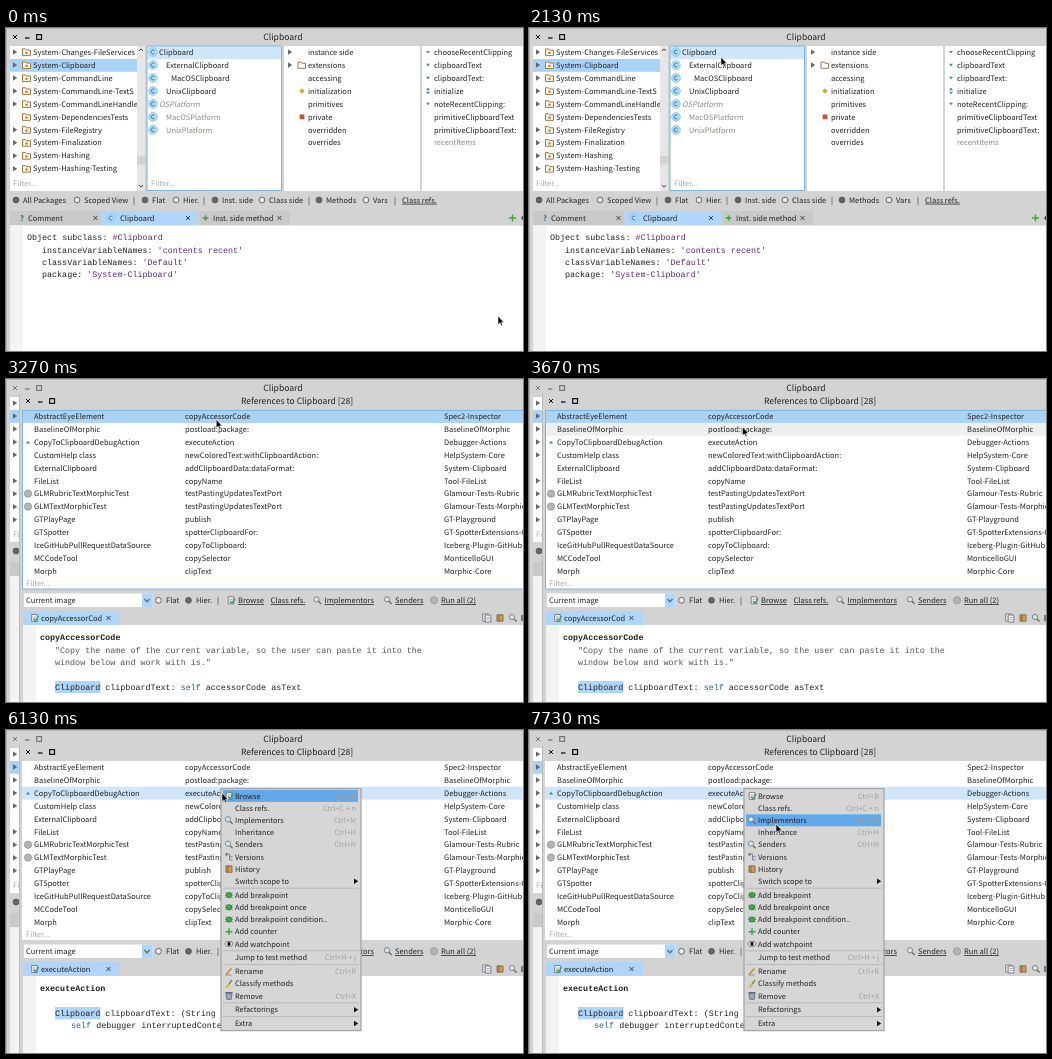
An HTML page for the animation above (8 s loop, 517 by 323 pixels).

```html
<!DOCTYPE html>
<html lang="en">
<head>
<meta charset="utf-8">
<title>Class browser</title>
<style>
html, body { margin: 0; width: 100%; height: 100%; overflow: hidden; background: #d3d3d3; }
svg { display: block; width: 517px; height: 323px; }
text { font: 7.5px "Noto Sans CJK JP", "Noto Sans CJK SC", "Open Sans", sans-serif; fill: #222; white-space: pre; text-rendering: geometricPrecision; }
.title { font-size: 8.57px; text-anchor: middle; }
.menu text { font-size: 7.4px; }
.menu .key { fill: #a2a2a2; text-anchor: end; }
.code { font: 8.39px "Liberation Mono", "DejaVu Sans Mono", monospace; }
.bold { font-weight: bold; }
.lit { fill: #5f2a78; }
.self { fill: #24627c; }
.note { fill: #555; }
.dim { fill: #8b8b84; }
.faint { fill: #a8a8a8; }
.it { font-style: italic; }
.link { text-decoration: underline; }
</style>
</head>
<body>
<svg id="stage" viewBox="0 0 517 323" xmlns="http://www.w3.org/2000/svg"></svg>
<script>
const LOOP = 8000, STEP = 200 / 3, ROW = 12.95, REF_ROW = 12.87;
const GRAY = '#d3d3d3', SEL = '#a9d2f7', SEL_SOFT = '#cfe5f8', TAB = '#afd5f8', HOVER = '#efefef', MENU_SEL = '#62a8ea';

const rect = (x, y, w, h, fill, more = '') => `<rect x="${x}" y="${y}" width="${w}" height="${h}" fill="${fill}" ${more}/>`;
const path = (d, stroke, width = 1, fill = 'none') => `<path d="${d}" stroke="${stroke}" stroke-width="${width}" fill="${fill}"/>`;
const shape = (d, fill) => `<path d="${d}" fill="${fill}"/>`;
const text = (x, y, s, cls = '') => `<text x="${x}" y="${y + 2.7}" class="${cls}">${s}</text>`;
const code = (x, y, s, cls = '') => text(x, y, s, 'code ' + cls);
const span = (cls, s) => `<tspan class="${cls}">${s}</tspan>`;
const group = (id, body, cls = '') => `<g id="${id}" class="${cls}">${body}</g>`;
const disc = (x, y, r, fill, stroke = 'none') => `<circle cx="${x}" cy="${y}" r="${r}" fill="${fill}" stroke="${stroke}" stroke-width=".9"/>`;
const right = (x, y, fill = '#666') => shape(`M${x - 2} ${y - 2.7}l4.2 2.7-4.2 2.7z`, fill);
const down = (x, y) => shape(`M${x - 2} ${y - 1.2}h4l-2 2.6z`, '#3b8f9f');
const up = (x, y) => shape(`M${x - 2} ${y + 1.2}h4l-2-2.6z`, '#3b8f9f');
const cross = (x, y, r = 2, color = '#444') => path(`M${x - r} ${y - r}l${2 * r} ${2 * r}m0 ${-2 * r}l${-2 * r} ${2 * r}`, color, 1);
const plus = (x, y, r = 3.4, color = '#3ba43b') => path(`M${x - r} ${y}h${2 * r}m${-r} ${-r}v${2 * r}`, color, 1.4);
const radio = (x, y, on) => disc(x, y, 2.9, on ? '#666' : '#eee', '#555');
const radios = (y, list) => list.map(([x, s, on, dx = 7]) => s === '|' ? text(x, y, '|') : radio(x, y, on) + text(x + dx, y, s)).join('');
const controls = (x, y, color) => cross(x, y, 2, color) + path(`M${x + 10} ${y + 1}h4.5`, color, 1.3) +
  path(`M${x + 21.7} ${y - 2.3}h4.8v4.6h-4.8z`, color, 1.2);
const classIcon = (x, y) => disc(x, y, 4.3, '#b4dcf3', '#8cc8ea') +
  path(`M${x + 1.5} ${y - 1.4}a2 2 0 1 0 0 2.8`, '#2a7fae', 1);

const icons = {
  page: (x, y) => path(`M${x - 2.8} ${y - 3.5}h5.6v7h-5.6z`, '#667', .8, '#f4f4fa') + path(`M${x - 1.5} ${y - 1}h3m-3 2h3`, '#88a', .7),
  browse: (x, y) => icons.page(x, y) + path(`M${x - 1} ${y + 1}l2 2 3-5`, '#3b9a4c', 1.3),
  mag: (x, y) => disc(x - 1, y - 1, 2.6, '#d9e7f0', '#6c7c88') + path(`M${x + 1} ${y + 1}l2.6 2.6`, '#86684d', 1.4),
  plus: (x, y) => plus(x, y),
  pen: (x, y) => path(`M${x - 3} ${y + 3}l5.5-6`, '#cc8b3c', 1.8) + path(`M${x - 3.4} ${y + 3.5}h6`, '#777', .8),
  trait: (x, y) => disc(x, y, 3.8, '#63bd71') + path(`M${x - 1.8} ${y - 1.6}h3.6m-1.8 0v4`, '#fff', .9),
  jump: (x, y) => disc(x, y, 3.6, '#4fae57') + path(`M${x - 2} ${y}h3.6m-1.5-1.6l1.6 1.6-1.6 1.6`, '#fff', .9),
  box: (x, y) => path(`M${x - 3} ${y - 2.5}h6l-.8 6h-4.4z`, '#5d6a78', .8, '#98a9ba') + path(`M${x - 3.6} ${y - 3.2}h7.2`, '#555', 1),
  bug: (x, y) => path(`M${x - 3.6} ${y - 2.5}l7.2 5m0-5l-7.2 5M${x - 4} ${y}h8`, '#3c6b3c', .7) + disc(x, y, 2.6, '#45a950', '#2c7637'),
  branch: (x, y) => path(`M${x - 3} ${y - 3}h3.5v6h3m-3-3h3`, '#7587a6', 1) + disc(x - 2.5, y - 2.5, 1.3, '#4f8bc5'),
  book: (x, y) => path(`M${x - 3} ${y - 3.2}h6v6.4h-6z`, '#79572e', .8, '#cd9f59') + path(`M${x - 1} ${y - 3}v6`, '#79572e', .8),
  eye: (x, y) => `<ellipse cx="${x}" cy="${y}" rx="4" ry="2.6" fill="#fff" stroke="#444" stroke-width=".7"/>` + disc(x, y, 1.8, '#111'),
  broom: (x, y) => path(`M${x + 3} ${y - 3.5}l-3 4`, '#8c6a42', 1.2) + shape(`M${x - .8} ${y - .4}l2 1.8-2 2.4h-3z`, '#d7b24b')
};

// Menus: [label, shortcut, icon]; '-' is a separator, '>' marks a submenu.
function makeMenu(id, x, y, w, h, items) {
  let cy = y + 7.3, body = '';
  const rows = [];
  for (const item of items) {
    if (item === '-') {
      body += path(`M${x + 2} ${cy - 5.3}h${w - 4}`, '#b2b2b2', .8);
      cy += 1.6;
      continue;
    }
    const [label, key = '', icon] = item;
    if (icon) body += icons[icon](x + 8, cy);
    body += text(x + 14, cy, label);
    body += key === '>' ? right(x + w - 5, cy, '#111') : text(x + w - 5, cy, key, 'key');
    rows.push(cy);
    cy += 12.2;
  }
  const back = rect(x, y, w, h, '#d6d6d6', 'stroke="#a6a6a6" stroke-width="1.3"');
  return { svg: group(id, back + rect(x + 2, y, w - 5, 12, MENU_SEL, `id="${id}Sel"`) + body, 'menu'), rows, id };
}

const classMenu = makeMenu('classMenu', 193, 22.6, 162, 141, [
  ['Browse', 'Ctrl+B', 'browse'], ['Class refs.', 'Ctrl+N'], ['Rename', 'Ctrl+R', 'pen'],
  ['Abstract instance variables', 'Ctrl+A + a', 'plus'], ['Generate accessors', 'Ctrl+G + a', 'plus'],
  ['New trait', '', 'trait'], ['Copy', 'Ctrl+C', 'page'], ['Jump to test class', 'Ctrl+G + j', 'jump'],
  ['Remove', 'Ctrl+X', 'box'], '-', ['Refactorings', '>'], '-', ['Extra', '>']]);

const methodMenu = makeMenu('methodMenu', 215, 58.6, 140, 242, [
  ['Browse', 'Ctrl+B', 'browse'], ['Class refs.', 'Ctrl+C + n'], ['Implementors', 'Ctrl+M', 'mag'],
  ['Inheritance', 'Ctrl+H'], ['Senders', 'Ctrl+N', 'mag'], ['Versions', '', 'branch'], ['History', '', 'book'],
  ['Switch scope to', '>'], '-', ['Add breakpoint', '', 'bug'], ['Add breakpoint once', '', 'bug'],
  ['Add breakpoint condition..', '', 'bug'], ['Add counter', '', 'plus'], ['Add watchpoint', '', 'eye'], '-',
  ['Jump to test method', 'Ctrl+H + j'], '-', ['Rename', 'Ctrl+R', 'pen'], ['Classify methods', '', 'broom'],
  ['Remove', 'Ctrl+X', 'box'], '-', ['Refactorings', '>'], '-', ['Extra', '>']]);

const rowY = i => 24.1 + i * ROW;
const refY = i => 37.5 + i * REF_ROW;
const list = (x, names) => names.map((s, i) => text(x, rowY(i), s)).join('');

function packagePane() {
  const names = ['Changes-FileServices', 'Clipboard', 'CommandLine', 'CommandLine-TextS', 'CommandLineHandle',
    'DependenciesTests', 'FileRegistry', 'Finalization', 'Hashing', 'Hashing-Testing'];
  return rect(4, 18, 127, 145, '#fff') + rect(4, 31, 127, 12.8, SEL) + names.map((s, i) => {
    const y = rowY(i);
    return (i === 5 ? '' : right(9, y)) + path(`M16.5 ${y - 3.2}h3l1 1.2h4v5.5h-8z`, '#a8793f', 1, '#fbf4e6') +
      rect(19.4, y - .2, 2.2, 2, '#a8793f') + text(27, y, 'System-' + s);
  }).join('') + text(7, 155.5, 'Filter...', 'faint') +
    rect(131, 18, 8, 145, '#e6e6e6') + rect(131, 128, 8, 8.5, '#d2d2d2') +
    path('M133 23l2-2.2 2 2.2M133 157l2 2.2 2-2.2', '#444', 1);
}

function classPane() {
  const classes = [[153, 'Clipboard'], [160, 'ExternalClipboard'], [165, 'MacOSClipboard'], [160, 'UnixClipboard'],
    [153, 'OSPlatform', 'dim it'], [160, 'MacOSPlatform', 'dim'], [160, 'UnixPlatform', 'dim']];
  return classes.map(([x, s, cls], i) => classIcon(147, rowY(i)) + text(x, rowY(i), s, cls)).join('') +
    text(145, 155.5, 'Filter...', 'faint') + group('classFocus', path('M141 18h134.5v144.5h-134.5z', '#7db6de', 1));
}

function memberPanes() {
  const methods = ['chooseRecentClipping', 'clipboardText', 'clipboardText:', 'initialize', 'noteRecentClipping:',
    'primitiveClipboardText', 'primitiveClipboardText:'];
  const y = rowY;
  return list(302, ['instance side', 'extensions', 'accessing', 'initialization', 'primitives', 'private', 'overridden', 'overrides']) +
    right(284, y(0)) + right(284, y(1)) +
    path(`M292 ${y(1) - 3}h3l1 1.2h3.5v5h-7.5z`, '#8b6a4b', .9, '#fff') +
    shape(`M296 ${y(3) - 2.8}l2.8 2.8-2.8 2.8-2.8-2.8z`, '#e3a338') + rect(293.6, y(5) - 2.4, 4.8, 4.8, '#c0593f') +
    list(428, methods) + text(428, y(7), 'recentItems', 'dim') +
    [0, 1, 2, 4].map(i => down(422, y(i))).join('') + up(422, y(3) - 2) + down(422, y(3) + 2);
}

const template = (name, vars, shared) => code(21, 209.7, `Object subclass: ${span('lit', '#' + name)}`) +
  code(36, 222, `instanceVariableNames: ${span('lit', `'${vars}'`)}`) +
  code(36, 234.3, `classVariableNames: ${span('lit', `'${shared}'`)}`);

const browser = rect(0, 0, 517, 323, GRAY) + path('M0 .5h517', '#b5b5b5') + path('M.5 0v323', '#b0b0b0') +
  group('liveControls', controls(9, 9, '#111')) + group('dimControls', controls(9, 9, '#777')) +
  packagePane() + rect(141, 18, 135, 145, '#fff') + rect(278, 18, 136, 145, '#fff') + rect(416, 18, 101, 145, '#fff') +
  rect(0, 0, 0, ROW, HOVER, 'id="paneHover"') + rect(141.5, 18.4, 134, 12.8, SEL_SOFT, 'id="classSel"') + classPane() +
  radios(172, [[10, 'All Packages', 1], [71, 'Scoped View'], [127, '|']]) +
  rect(4, 183, 91, 14, '#c9c9c9') + rect(95.5, 183, 96.5, 14, TAB) + text(14, 190, '?', 'bold self') +
  text(22, 190, 'Comment') + cross(89.5, 190) + cross(182, 190) +
  rect(4, 197.5, 513, 126, '#fff') + rect(4, 197.5, 13, 126, '#f3f3f3') +
  code(36, 246.6, `package: ${span('lit', "'System-Clipboard'")}`) +
  group('selected', text(277, 9.3, 'Clipboard', 'title') + memberPanes() +
    radios(172, [[139, 'Flat', 1], [170, 'Hier.'], [197, '|'], [209, 'Inst. side', 1], [256, 'Class side'], [302, '|'],
      [313, 'Methods', 1], [360, 'Vars'], [388, '|']]) + text(396, 172, 'Class refs.', 'link') +
    rect(192.8, 183, 91, 14, '#c9c9c9') + plus(199.5, 190, 2.8) + text(207, 190, 'Inst. side method') + cross(273.5, 190) +
    plus(506.5, 190, 3.6) + shape('M517 187.5l-2 2.5 2 2.5z', '#444') + classIcon(105, 190) + text(114, 190, 'Clipboard') +
    template('Clipboard', 'contents recent', 'Default')) +
  group('unselected', text(278, 9.3, 'System-Clipboard', 'title') +
    radios(172, [[139, 'Inst. side', 1], [187, 'Class side']]) + plus(107.5, 190, 3.4, '#3f97a0') +
    shape('M517 187.5l-2 2.5 2 2.5z', '#444') + text(114, 190, 'New class') + template('NameOfSubclass', '', ''));

function refTable() {
  const refs = `AbstractEyeElement|copyAccessorCode|Spec2-Inspector
BaselineOfMorphic|postload:package:|BaselineOfMorphic
CopyToClipboardDebugAction|executeAction|Debugger-Actions
CustomHelp class|newColoredText:withClipboardAction:|HelpSystem-Core
ExternalClipboard|addClipboardData:dataFormat:|System-Clipboard
FileList|copyName|Tool-FileList
GLMRubricTextMorphicTest|testPastingUpdatesTextPort|Glamour-Tests-Rubric
GLMTextMorphicTest|testPastingUpdatesTextPort|Glamour-Tests-Morphic
GTPlayPage|publish|GT-Playground
GTSpotter|spotterClipboardFor:|GT-SpotterExtensions-Core
IceGitHubPullRequestDataSource|copyToClipboard:|Iceberg-Plugin-GitHub
MCCodeTool|copySelector|MonticelloGUI
Morph|clipText|Morphic-Core`;
  return refs.split('\n').map((line, i) => line.split('|').map((s, c) => text([28, 179, 438][c], refY(i), s)).join('')).join('') +
    up(22, refY(2)) + [6, 7].map(i => disc(22, refY(i), 3.6, '#b5b5b5', '#999')).join('');
}

const references = rect(13, 15, 504, 308, GRAY) + path('M13.5 323V15', '#bbb') + controls(22, 22, '#111') +
  text(291, 22.3, 'References to Clipboard [28]', 'title') +
  rect(16, 31, 501, 179, '#fff') + rect(16, 0, 501, REF_ROW, HOVER, 'id="refHover"') + rect(16, 0, 501, REF_ROW, SEL, 'id="refSel"') +
  refTable() + text(20, 204, 'Filter...', 'faint') + group('refFocus', path('M517 31.4H16.5V210H517', '#7db6de', 1)) +
  rect(18, 214.5, 128.5, 13.5, '#fff') + text(20, 221.3, 'Current image') +
  rect(136, 214.5, 10.5, 13.5, TAB) + path('M138.5 220l2.5 2.8 2.5-2.8', '#567', 1.2) +
  radios(221.3, [[152.5, 'Flat', 0, 7.5], [182.5, 'Hier.', 1, 7.5], [211, '|']]) +
  icons.browse(225, 221.3) + icons.mag(311.5, 221.3) + icons.mag(382, 221.3) + disc(428, 221.3, 3.6, '#b5b5b5', '#999') +
  [[232, 'Browse'], [264.5, 'Class refs.'], [318.5, 'Implementors'], [389, 'Senders'], [435, 'Run all (2)']]
    .map(([x, s]) => text(x, 221.3, s, 'link')).join('') +
  rect(17, 232, 97, 14, TAB) + icons.browse(28.5, 239) + cross(102.5, 239) +
  icons.page(479.5, 238.5) + icons.page(482, 239.5) + icons.book(494, 239) + icons.mag(507, 239) + rect(515, 236, 2, 6, '#777') +
  rect(17, 246, 500, 77, '#fff') + rect(17, 246, 13, 77, '#f3f3f3') +
  group('accessorCode', text(35, 239, 'copyAccessorCod') + code(34, 258.4, 'copyAccessorCode', 'bold') +
    code(49, 271, '"Copy the name of the current variable, so the user can paste it into the', 'note') +
    code(49, 283.3, 'window below and work with is."', 'note') + rect(49, 302, 45.5, 12, TAB) +
    code(49, 308, `Clipboard clipboardText: ${span('self', 'self')} accessorCode asText`)) +
  group('actionCode', text(35, 239, 'executeAction') + code(34, 258.4, 'executeAction', 'bold') +
    rect(49, 277, 45.5, 12.3, TAB) + code(49, 283.3, 'Clipboard clipboardText: (String streamContents: [ :s |') +
    code(65, 295.6, `${span('self', 'self')} debugger interruptedContext shortDebugStackOn: s ])`));

const pointer = `<path id="pointer" d="M0 0V8.6L2 6.9 3.3 9.7 4.6 9.1 3.4 6.4H6z" fill="#000" stroke="#fff" stroke-width=".6"/>`;

document.getElementById('stage').innerHTML = browser + group('references', references) + classMenu.svg + methodMenu.svg + pointer;

const el = id => document.getElementById(id);
const show = (id, on) => el(id).setAttribute('display', on ? 'inline' : 'none');
const set = (id, values) => { for (const k in values) el(id).setAttribute(k, values[k]); };

// Pointer stops: [tick, x, y].
const stops = [[0, 492, 288], [10, 187, 27], [12, 187, 27], [13, 188, 28], [20, 188, 28], [26, 190.5, 26.5],
  [27, 190.5, 26.5], [29, 192, 29], [32, 192, 29], [39, 210, 40], [48, 210, 40], [55, 213.5, 48], [58, 213.5, 48],
  [63, 216, 54.8], [76, 216, 55], [78, 216, 62], [92, 216, 63], [95, 216, 63], [103, 236, 91], [105, 236, 91],
  [111, 246, 99], [116, 247, 94], [200, 247, 94]];

function pointerAt(tick) {
  const i = stops.findIndex(s => s[0] > tick);
  const [a, b] = [stops[i - 1], stops[i]];
  const p = (tick - a[0]) / (b[0] - a[0]), e = p * p * (3 - 2 * p);
  return [a[1] + (b[1] - a[1]) * e, a[2] + (b[2] - a[2]) * e];
}

function updateMenu(menu, on, y) {
  show(menu.id, on);
  const cy = menu.rows.reduce((best, r) => Math.abs(r - y) < Math.abs(best - y) ? r : best);
  set(menu.id + 'Sel', { y: cy - 6 });
}

function hoverPane(x, y, on) {
  const pane = [[141.5, 276, 7], [278, 414, 8], [416, 517, 8]].find(p => x >= p[0] && x < p[1]);
  const row = Math.floor((y - 18) / ROW);
  const hit = on && pane && row >= 0 && row < pane[2];
  show('paneHover', hit);
  if (hit) set('paneHover', { x: pane[0], width: pane[1] - pane[0], y: 18 + row * ROW });
}

function update(ms) {
  const tick = Math.floor((ms % LOOP + 4) / STEP);
  const [x, y] = pointerAt(tick);
  const cleared = tick >= 20 && tick < 32, refsOpen = tick >= 49, picked = tick >= 83;
  const classMenuOn = tick >= 33 && !refsOpen, methodMenuOn = tick >= 92;

  show('selected', !cleared);
  show('unselected', cleared);
  show('classSel', !cleared);
  set('classSel', { fill: classMenuOn ? SEL : SEL_SOFT });
  show('classFocus', !classMenuOn);
  show('liveControls', !refsOpen);
  show('dimControls', refsOpen);
  hoverPane(x, y, tick < 33 && tick !== 20);

  show('references', refsOpen);
  show('accessorCode', !picked);
  show('actionCode', picked);
  show('refFocus', !methodMenuOn);
  show('refHover', !methodMenuOn);
  set('refHover', { y: 31 + Math.floor((y - 31) / REF_ROW) * REF_ROW });
  set('refSel', { y: 31 + (picked ? 2 : 0) * REF_ROW, fill: methodMenuOn ? SEL_SOFT : SEL });

  updateMenu(classMenu, classMenuOn, y);
  updateMenu(methodMenu, methodMenuOn, y);
  set('pointer', { transform: `translate(${x} ${y})` });
}

const start = performance.now();
function loop() {
  update(performance.now() - start);
  requestAnimationFrame(loop);
}
loop();
</script>
</body>
</html>
```
